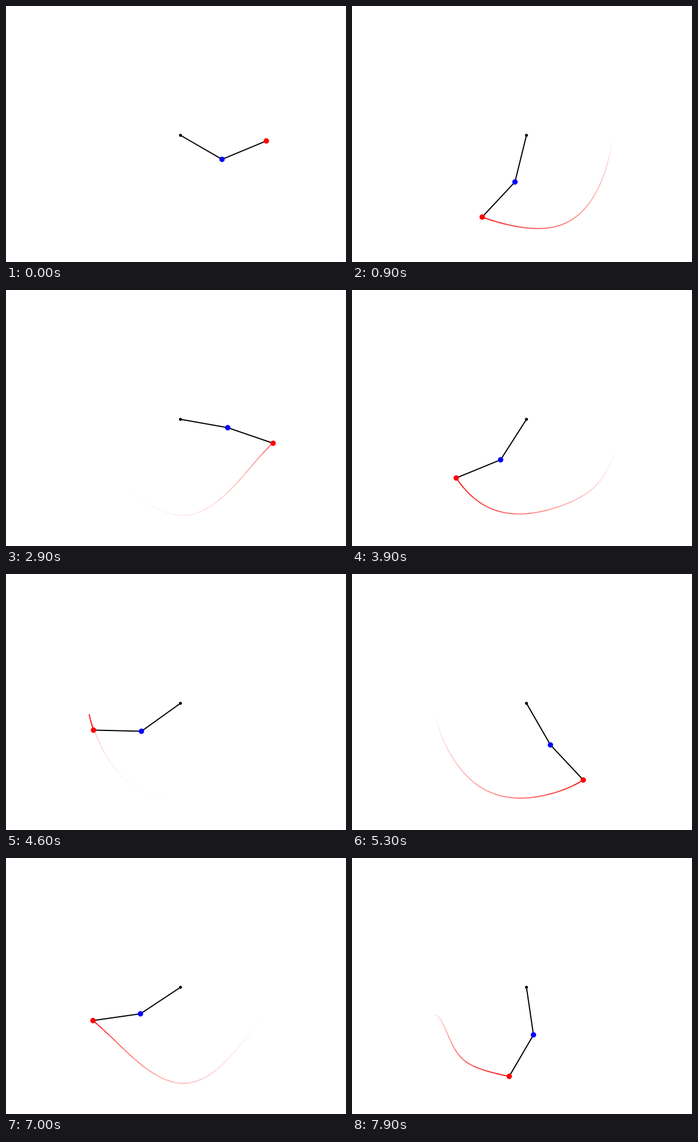
A matplotlib script that plays this animation: 599 by 450 pixels, repeating every 8000 ms.

```python
import numpy as np
import matplotlib.pyplot as plt
from matplotlib.animation import FuncAnimation
from matplotlib.patches import Circle

W, H, DPI = 599, 450, 64
PT = 72 / DPI                   # points per pixel
FRAMES, INTERVAL = 80, 100

# Two equal rods and masses, released from rest
L, M, G = 1.0, 1.0, 9.81
START = [np.pi / 3, 0, 5 * np.pi / 8, 0]
DT, SUBSTEPS = 0.01, 5
STEPS_PER_FRAME = 10

R = 0.05                        # bob radius
SCALE = 0.77 * H / (2 * (2 * L + R))
CX, CY = 307.38, 222.75         # pivot in pixels, from the lower left

SEGMENTS, SEG_LEN = 20, 5       # one second of fading trail


def deriv(state):
    a1, w1, a2, w2 = state
    c, s = np.cos(a1 - a2), np.sin(a1 - a2)
    den = L * M * (1 + s * s)
    dw1 = M * (G * np.sin(a2) * c - s * L * (w1 ** 2 * c + w2 ** 2)
               - 2 * G * np.sin(a1)) / den
    dw2 = M * (2 * (L * w1 ** 2 * s - G * np.sin(a2) + G * np.sin(a1) * c)
               + L * w2 ** 2 * s * c) / den
    return np.array([w1, dw1, w2, dw2])


def rk4(state, h):
    k1 = deriv(state)
    k2 = deriv(state + h / 2 * k1)
    k3 = deriv(state + h / 2 * k2)
    k4 = deriv(state + h * k3)
    return state + h / 6 * (k1 + 2 * k2 + 2 * k3 + k4)


def simulate():
    state = np.array(START, dtype=float)
    angles = []
    for _ in range(FRAMES * STEPS_PER_FRAME + 1):
        angles.append((state[0], state[2]))
        for _ in range(SUBSTEPS):
            state = rk4(state, DT / SUBSTEPS)
    return np.array(angles).T


a1, a2 = simulate()
x1, y1 = L * np.sin(a1), -L * np.cos(a1)
x2, y2 = x1 + L * np.sin(a2), y1 - L * np.cos(a2)

fig = plt.figure(figsize=(W / DPI, H / DPI), dpi=DPI, facecolor="white")
ax = fig.add_axes([0, 0, 1, 1])
ax.set_xlim(-CX / SCALE, (W - CX) / SCALE)
ax.set_ylim(-CY / SCALE, (H - CY) / SCALE)
ax.axis("off")


def disc(radius, color):
    return ax.add_patch(Circle((0, 0), radius, fc=color, ec=color,
                               lw=PT, zorder=10))


rods, = ax.plot([], [], color="k", lw=2 * PT)
pivot = disc(R / 2, "k")
bob1 = disc(R, "b")
bob2 = disc(R, "r")
trail = [ax.plot([], [], color="r", lw=2 * PT, solid_capstyle="butt",
                 alpha=(j / SEGMENTS) ** 2)[0] for j in range(SEGMENTS)]


def update(frame):
    i = frame * STEPS_PER_FRAME
    rods.set_data([0, x1[i], x2[i]], [0, y1[i], y2[i]])
    bob1.center = x1[i], y1[i]
    bob2.center = x2[i], y2[i]
    for j, line in enumerate(trail):
        k = i - (SEGMENTS - j) * SEG_LEN
        part = slice(k, k + SEG_LEN + 1) if k >= 0 else slice(0, 0)
        line.set_data(x2[part], y2[part])
    return [rods, bob1, bob2, *trail]


anim = FuncAnimation(fig, update, frames=FRAMES, interval=INTERVAL,
                     init_func=lambda: update(0), repeat=True,
                     repeat_delay=0, blit=False)
plt.show()
```
